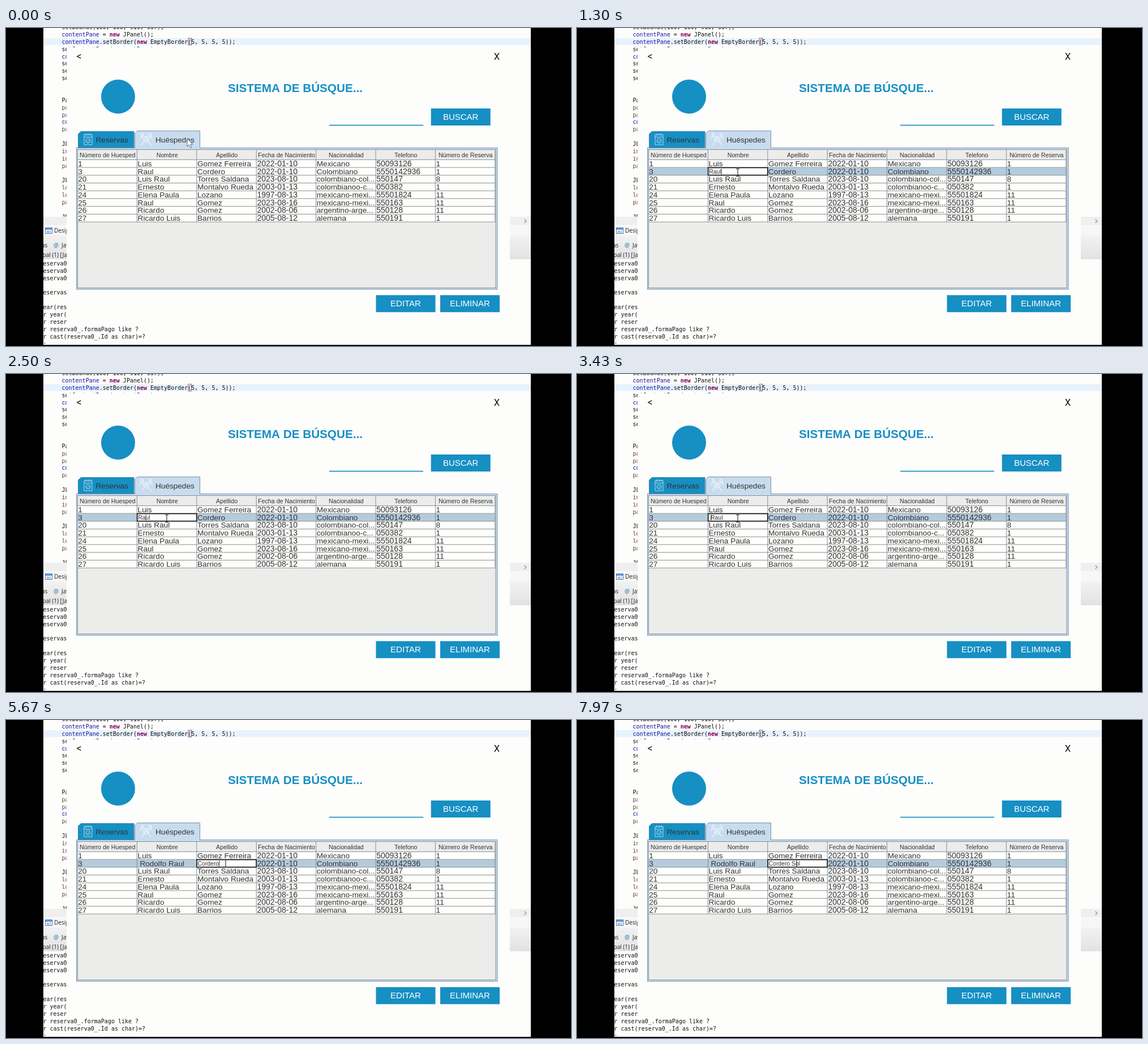
Recreate the animation shown at these times as an HTML page with a canvas. Size 998 px wide and 561 px high, loop 8 s.

```html
<!DOCTYPE html>
<html lang="es">
<head>
<meta charset="utf-8">
<style>
html, body { margin: 0; width: 100%; height: 100%; overflow: hidden; background: #000; }
canvas { display: block; }
</style>
</head>
<body>
<canvas id="stage" width="998" height="561"></canvas>
<script>
const ctx = document.getElementById('stage').getContext('2d');
const LOOP = 8000;
const PAPER = '#fdfdfc', BLUE = '#168fc3', PALE = '#c8dcf0', GRID = '#7f909f', INK = '#333', SELECTED = '#b4cbdf';
const SANS = '"Liberation Sans", Arial, sans-serif';
const MONO = '"DejaVu Sans Mono", monospace';
const UI = '"Open Sans", "Noto Sans", sans-serif';

const TABLE = { x: 126, y: 214.5, header: 18, col: 105.4, row: 13.73, width: 738 };
const HEADERS = ['Número de Huesped', 'Nombre', 'Apellido', 'Fecha de Nacimiento', 'Nacionalidad', 'Telefono', 'Número de Reserva'];
const GUESTS = [
  ['1', 'Luis', 'Gomez Ferreira', '2022-01-10', 'Mexicano', '50093126', '1'],
  ['3', 'Raul', 'Cordero', '2022-01-10', 'Colombiano', '5550142936', '1'],
  ['20', 'Luis Raul', 'Torres Saldana', '2023-08-10', 'colombiano-col...', '550147', '8'],
  ['21', 'Ernesto', 'Montalvo Rueda', '2003-01-13', 'colombianoo-c...', '050382', '1'],
  ['24', 'Elena Paula', 'Lozano', '1997-08-13', 'mexicano-mexi...', '55501824', '11'],
  ['25', 'Raul', 'Gomez', '2023-08-16', 'mexicano-mexi...', '550163', '11'],
  ['26', 'Ricardo', 'Gomez', '2002-08-06', 'argentino-arge...', '550128', '11'],
  ['27', 'Ricardo Luis', 'Barrios', '2005-08-12', 'alemana', '550191', '1']
];
const EDITED_ROW = 1;
const SELECT_AT = 800;
const keys = (start, step, count) => Array.from({ length: count }, (_, i) => start + i * step);
const EDITS = [
  { col: 1, open: 1250, close: 5080, before: '', after: 'Raul', typed: ' Rodolfo ',
    moves: keys(2200, 180, 4), strokes: [3200, ...keys(3600, 115, 8)] },
  { col: 2, open: 5500, close: LOOP, before: 'Cordero', after: '', typed: ' Sol',
    moves: [], strokes: keys(6980, 160, 4) }
];
// time, x, y of the pointer
const POINTER = [[0, 320, 195], [150, 320, 196], [700, 282, 255], [1250, 282, 255], [1300, 284, 255],
  [5080, 284, 255], [5380, 388, 253], [LOOP, 388, 253]];

const CODE = [
  [-1, 'setBounds(100, 100, 910, 537);'],
  [0, '@contentPane# = ~new# JPanel();'],
  [1, '@contentPane#.setBorder(~new# EmptyBorder(5, 5, 5, 5));'],
  [2, 'setContentPane(@contentPane#);'], [3, '@co'], [4, 'se'], [5, 'se'], [6, 'se'],
  [9, 'Pa'], [10, '%pa'], [11, '%pa'], [12, '@co'], [13, '%pa'],
  [15, 'JL'], [16, '%in'], [17, '%in'], [18, '%pa'],
  [20, 'JL'], [21, '%lo'], [22, '%lo'], [23, '%pa'], [25, 'JP']
];
const CODE_COLORS = { '@': '#1414a0', '~': '#7f0055', '%': '#6a3e3e', '#': '#111' };
const CONSOLE = [[0, 'eserva0_'], [1, 'eserva0_'], [2, 'eserva0_'], [4, 'eservas'], [6, 'ear(rese'],
  [7, 'r year('], [8, 'r reserv'], [9, 'r reserva0_.formaPago like ?'], [10, 'r cast(reserva0_.Id as char)=?'], [11, ':']];

function rect(x, y, w, h, color) {
  ctx.fillStyle = color;
  ctx.fillRect(x, y, w, h);
}
function frame(x, y, w, h, color, width = 1) {
  ctx.strokeStyle = color;
  ctx.lineWidth = width;
  ctx.strokeRect(x, y, w, h);
}
function text(s, x, y, font, color = INK, align = 'left') {
  ctx.font = font;
  ctx.fillStyle = color;
  ctx.textAlign = align;
  ctx.fillText(s, x, y);
}
function path(d, stroke, fill, width = 1) {
  const p = new Path2D(d);
  if (fill) { ctx.fillStyle = fill; ctx.fill(p); }
  if (stroke) { ctx.strokeStyle = stroke; ctx.lineWidth = width; ctx.stroke(p); }
}
function clipped(x, y, w, h, draw) {
  ctx.save();
  ctx.beginPath();
  ctx.rect(x, y, w, h);
  ctx.clip();
  draw();
  ctx.restore();
}

function codeLine(line, x, y) {
  let color = CODE_COLORS['#'];
  for (const ch of line) {
    if (CODE_COLORS[ch]) { color = CODE_COLORS[ch]; continue; }
    text(ch, x, y, (color === CODE_COLORS['~'] ? 'bold ' : '') + '10px ' + MONO, color);
    x += 6.02;
  }
}

function drawIde() {
  rect(66, 0, 861, 559, PAPER);
  rect(66, 18, 861, 12, '#e8f2fd');
  clipped(66, 0, 861, 333, () => CODE.forEach(([i, s]) => codeLine(s, 98.5, 15 + i * 12.87)));
  frame(322, 18, 5.5, 12, '#8a5a86');
  rect(66, 333, 861, 15, '#efefef');
  path('M915.5 337.5l3.5 3.2l-3.5 3.2', '#999', null, 1.3);
  rect(66, 349, 861, 17, '#f7f7f7');
  const shade = ctx.createLinearGradient(0, 366, 0, 408);
  shade.addColorStop(0, '#f2f2f2');
  shade.addColorStop(1, '#e2e2e2');
  rect(66, 366, 861, 42, shade);
  rect(69.5, 352.5, 12, 10, '#fff');
  frame(69.5, 352.5, 12, 10, '#4a74b0');
  rect(70, 353, 11, 3, '#6d9bd8');
  path('M72 358.5h4M72 360.5h4M78 357v5', '#4a74b0');
  text('Design', 85, 361, '10px ' + UI, '#222');
  text('as', 63, 387, '10px ' + UI, '#222');
  text('@', 84, 387, '10px ' + UI, '#1d6f96');
  text('Javadoc', 98, 387, '10px ' + UI, '#222');
  text('pal (1) [Java', 64.5, 404, '10px ' + UI, '#222');
  clipped(66, 408, 861, 151, () => CONSOLE.forEach(([i, s]) => codeLine(s, 65.5, 419 + i * 12.87)));
  rect(0, 0, 66, 561, '#000');
}

function button(label, x, y) {
  rect(x, y, 105, 30, BLUE);
  text(label, x + 52.5, y + 20.1, '15px ' + SANS, '#fff', 'center');
}

function drawTabs() {
  path('M127.5 211V187L132.5 182.5H226V211Z', '#3f86ab', BLUE);
  path('M227.5 212V186L232 181.5H342.5V212Z', GRID, PALE);
  path('M138 188h14v18h-14zM138 192.5h14M141 186v4M145 186v4M149 186v4', '#b5dced');
  path('M149 199a4 4 0 1 1-8 0a4 4 0 1 1 8 0M143 199l1.5 1.8l3-3.5', '#b5dced');
  path('M252.5 196a5 5 0 1 1-10 0a5 5 0 1 1 10 0M249.5 194.5a2 2 0 1 1-4 0a2 2 0 1 1 4 0M244 199q3.5-4 7 0M251 200l6 7', '#f2f8fc', null, 1.1);
  path('M243 188a2.3 2.3 0 1 1-4.6 0a2.3 2.3 0 1 1 4.6 0M257 188a2.3 2.3 0 1 1-4.6 0a2.3 2.3 0 1 1 4.6 0M237 196q0-5 5-4M258 196q0-5-5-4M240 207q0-6 4-5', '#f2f8fc', null, 1.1);
  text('Reservas', 158.5, 202, '13.6px ' + SANS);
  text('Huéspedes', 264, 202, '13.6px ' + SANS);
}

function drawWindow() {
  rect(107, 34, 783, 491, PAPER);
  text('<', 124.5, 56, '18px Roboto, sans-serif', '#222');
  text('X', 867, 56, '16.5px Roboto, sans-serif', '#111', 'center');
  ctx.fillStyle = BLUE;
  ctx.beginPath();
  ctx.arc(198, 121, 30, 0, Math.PI * 2);
  ctx.fill();
  text('SISTEMA DE BÚSQUE...', 392, 113, 'bold 20.7px ' + SANS, BLUE);
  rect(571, 170.7, 166, 1.7, BLUE);
  button('BUSCAR', 750.7, 142);
  button('EDITAR', 653.5, 471.3);
  button('ELIMINAR', 767, 471.3);
  rect(125, 211, 743, 250, PALE);
  frame(124.5, 211.5, 743.5, 249.5, GRID);
  drawTabs();
  rect(228, 210, 114, 3, PALE);
}

function editState(edit, t) {
  const count = edit.strokes.filter(k => k <= t).length;
  const moved = edit.moves.filter(k => k <= t).length;
  const prefix = edit.before + edit.typed.slice(0, count);
  const events = [edit.open, ...edit.moves, ...edit.strokes].filter(k => k <= t);
  const last = events[events.length - 1];
  return {
    value: prefix + edit.after,
    caret: prefix + edit.after.slice(0, edit.after.length - moved),
    caretOn: Math.floor((t - last) / 500) % 2 === 0
  };
}

function cellText(row, col, t) {
  const edit = row === EDITED_ROW && EDITS.find(e => e.col === col && t >= e.close);
  return edit ? editState(edit, t).value : GUESTS[row][col];
}

function drawEditor(edit, t) {
  const x = TABLE.x + edit.col * TABLE.col;
  const y = TABLE.y + TABLE.header + EDITED_ROW * TABLE.row;
  const { value, caret, caretOn } = editState(edit, t);
  rect(x, y, TABLE.col, TABLE.row, '#fff');
  frame(x + 0.3, y + 0.2, TABLE.col - 0.4, TABLE.row - 0.6, '#111', 1.6);
  text(value, x + 1.8, y + 10.7, '10.4px ' + SANS);
  if (caretOn) rect(x + 2 + ctx.measureText(caret).width, y + 2, 1, 10, '#333');
}

function drawTable(t) {
  const { x, y, header, col, row, width } = TABLE;
  const top = y + header, bottom = top + row * GUESTS.length;
  rect(x, y, width + 1, 244, '#ececeb');
  rect(x, top, width, bottom - top, '#fefefd');
  if (t >= SELECT_AT) rect(x, top + row * EDITED_ROW, width, row, SELECTED);
  HEADERS.forEach((label, c) => clipped(x + c * col, y, col, header, () =>
    text(label, x + (c + 0.5) * col + 0.6, 228, '10.7px ' + SANS, INK, 'center')));
  GUESTS.forEach((guest, r) => guest.forEach((_, c) => clipped(x + c * col, top + r * row, col, row, () => {
    const size = c === 3 || c === 5 ? 14 : 13.6;
    text(cellText(r, c, t), x + c * col + 1.2, top + r * row + 11.5, size + 'px ' + SANS);
  })));
  for (let r = 0; r <= GUESTS.length; r++) rect(x, top + r * row - 0.7, width, 1, r ? '#8b9283' : GRID);
  for (let c = 1; c <= HEADERS.length; c++) rect(x + c * col - 0.5, y, 1, bottom - y, GRID);
  frame(126.5, 214.5, 738.5, 244, GRID);

  const edit = EDITS.find(e => t >= e.open && t < e.close);
  if (edit) drawEditor(edit, t);
  else if (t >= SELECT_AT) frame(x + col, top + row, col, row, '#6486b4');
}

function drawPointer(t) {
  const i = Math.max(1, POINTER.findIndex(p => p[0] > t));
  const [t0, x0, y0] = POINTER[i - 1], [t1, x1, y1] = POINTER[i];
  const k = (t - t0) / (t1 - t0), e = k * k * (3 - 2 * k);
  ctx.save();
  ctx.translate(x0 + (x1 - x0) * e, y0 + (y1 - y0) * e);
  const editing = EDITS.some(edit => t >= edit.open && t < edit.close);
  if (editing) path('M-3 -6.5h2.5l.5 .5l.5-.5h2.5M0 -6V6M-3 6.5h2.5l.5-.5l.5 .5h2.5', '#222', null, 1.1);
  else path('M0 0V14L3.2 11L5.5 16.2L8 15.1L5.7 10H10.2Z', '#555', '#fff', 0.9);
  ctx.restore();
}

function draw() {
  const t = performance.now() % LOOP;
  rect(0, 0, 998, 561, '#000');
  drawIde();
  drawWindow();
  drawTable(t);
  drawPointer(t);
  requestAnimationFrame(draw);
}
draw();
</script>
</body>
</html>
```
